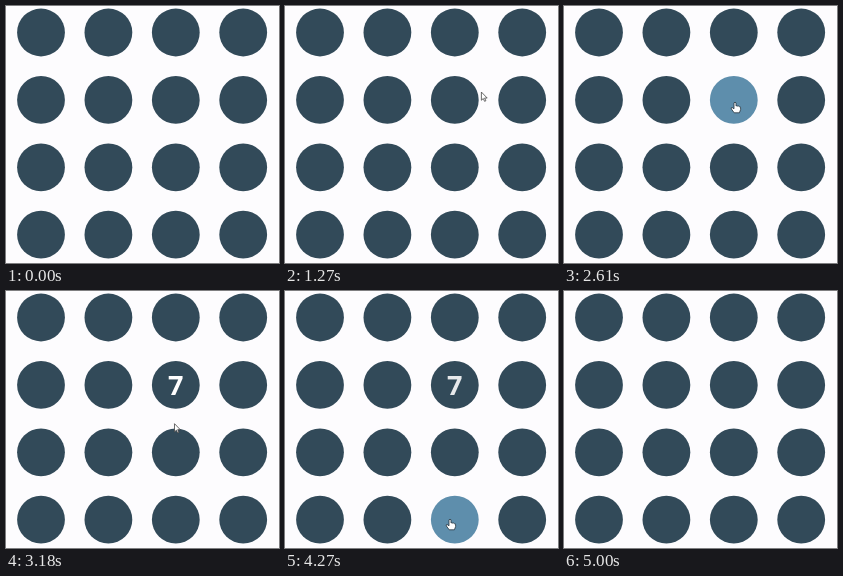
Recreate the animation shown at these times as an HTML page with a canvas. Size 273 by 257 pixels, loop 5030 ms.

```html
<!DOCTYPE html>
<html>
<head>
<meta charset="utf-8">
<style>
html, body { margin: 0; width: 100%; height: 100%; overflow: hidden; background: #fdfcfe; }
canvas { display: block; width: 273px; height: 257px; }
</style>
</head>
<body>
<canvas id="stage"></canvas>
<script>
const W = 273, H = 257, LOOP = 5030, RESET = 4940;
const R = 23.9, STEP = 67.4, X0 = 35, Y0 = 26.5;
const DARK = [50, 74, 89], BLUE = [94, 142, 172];

const canvas = document.getElementById('stage');
const ctx = canvas.getContext('2d');
const dpr = window.devicePixelRatio || 1;
canvas.width = W * dpr;
canvas.height = H * dpr;

// time, x, y of the pointer tip
const path = [
  [640, 281, 42], [730, 269.5, 48.5], [1040, 222, 76], [1500, 171, 96],
  [2860, 171, 96], [3180, 168.5, 132.5], [3720, 165, 228], [RESET, 165, 228]
];

const clamp = v => Math.max(0, Math.min(1, v));
const ease = v => v * v * (3 - 2 * v);
const ramp = (t, a, b) => ease(clamp((t - a) / (b - a)));
const pulse = (t, a, b, c, d) => ramp(t, a, b) * (1 - ramp(t, c, d));
const mix = k => 'rgb(' + DARK.map((v, i) => Math.round(v + (BLUE[i] - v) * k)) + ')';
const cx = col => X0 + col * STEP;
const cy = row => Y0 + row * STEP;

function pointerAt(t) {
  if (t < path[0][0] || t >= RESET) return null;
  const i = path.findIndex(p => p[0] > t);
  const a = path[i - 1], b = path[i];
  const k = (t - a[0]) / (b[0] - a[0]);
  return [a[1] + (b[1] - a[1]) * k, a[2] + (b[2] - a[2]) * k];
}

function overDot(x, y) {
  const col = Math.round((x - X0) / STEP), row = Math.round((y - Y0) / STEP);
  return col < 4 && row < 4 && Math.hypot(x - cx(col), y - cy(row)) < R;
}

function shape(x, y, d, line) {
  const p = new Path2D(d);
  ctx.save();
  ctx.translate(x, y);
  ctx.lineJoin = 'round';
  ctx.lineWidth = 0.8;
  ctx.strokeStyle = line;
  ctx.fillStyle = '#fff';
  ctx.fill(p);
  ctx.stroke(p);
  ctx.restore();
}

function drawPointer(x, y) {
  if (overDot(x, y)) {
    shape(x, y, 'M-1 .8Q0-.4 1 .8V4Q2 3.2 2.8 4.2Q3.8 3.6 4.4 4.7Q5.6 4.4 5.6 5.8' +
      'V7.6L4.4 10.8H-.8L-3.6 7Q-4.4 5.7-3 5.4L-1 6.8Z', '#26343e');
  } else {
    shape(x, y, 'M0 0V8.2L1.9 6.5L3.2 9.3L4.5 8.7L3.2 6H5.8Z', '#444');
  }
}

function draw(t) {
  ctx.setTransform(dpr, 0, 0, dpr, 0, 0);
  ctx.fillStyle = '#fdfcfe';
  ctx.fillRect(0, 0, W, H);

  const live = t < RESET;
  const glow = {
    '2,1': pulse(t, 2240, 2560, 2660, 2980),
    '2,3': live ? pulse(t, 3880, 4200, 4320, 4640) : 0
  };
  for (let row = 0; row < 4; row++) {
    for (let col = 0; col < 4; col++) {
      ctx.fillStyle = mix(glow[col + ',' + row] || 0);
      ctx.beginPath();
      ctx.arc(cx(col), cy(row), R, 0, Math.PI * 2);
      ctx.fill();
    }
  }

  const shown = live ? pulse(t, 2700, 3000, 4170, 4640) : 0;
  if (shown > 0) {
    ctx.globalAlpha = shown;
    ctx.fillStyle = '#fff';
    ctx.font = 'bold 27px "Open Sans", "Noto Sans", sans-serif';
    ctx.textAlign = 'center';
    ctx.fillText('7', cx(2), 104);
    ctx.globalAlpha = 1;
  }

  const p = pointerAt(t);
  if (p) drawPointer(p[0], p[1]);
}

function frame() {
  draw(performance.now() % LOOP);
  requestAnimationFrame(frame);
}
frame();
</script>
</body>
</html>
```
